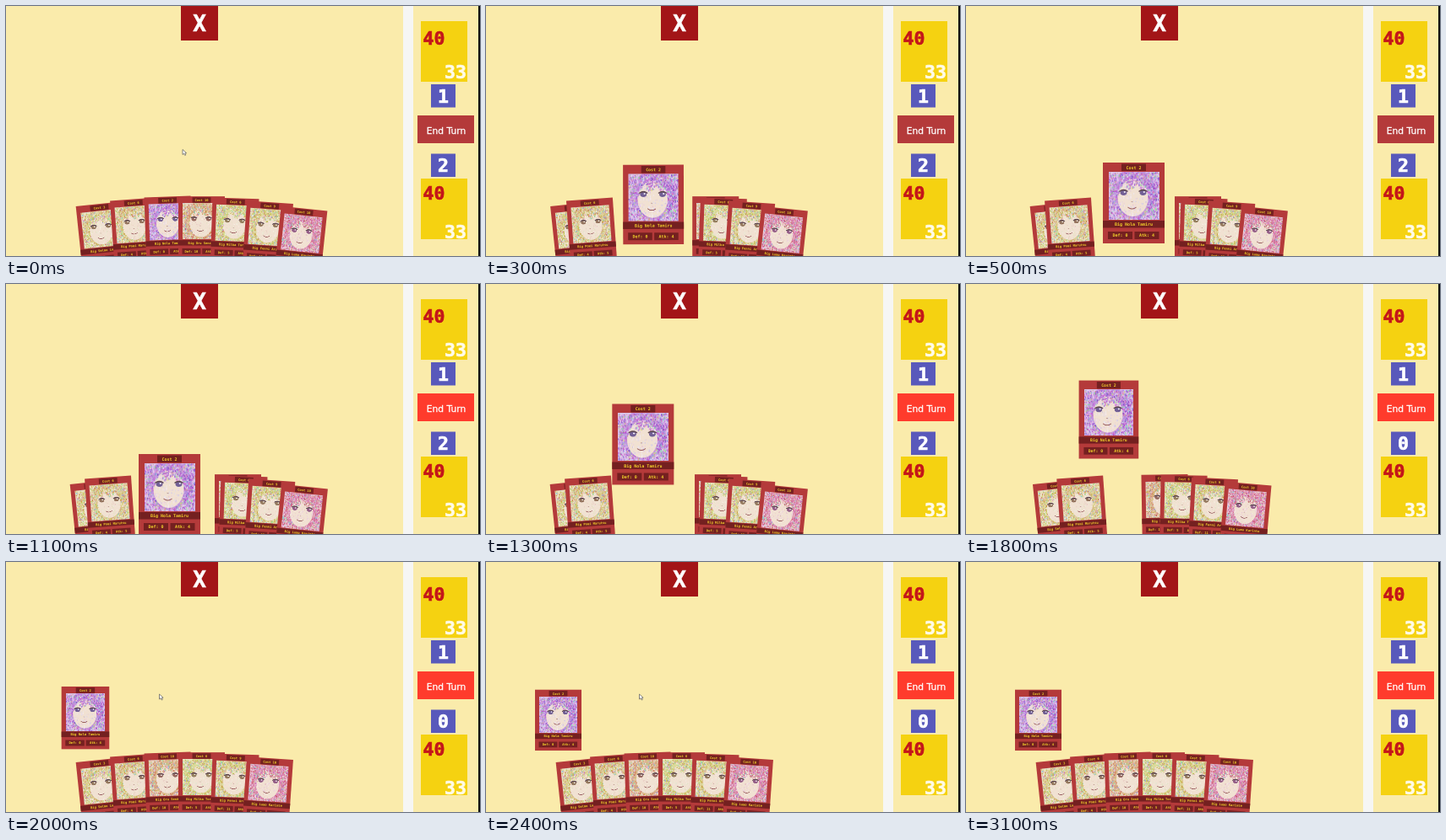
Write an HTML page with a canvas that moves like this. It is 561x297 px and loops after 3.3 s.

```html
<!DOCTYPE html>
<html lang="en">
<head>
<meta charset="utf-8">
<title>Card table</title>
<style>
  html, body { margin: 0; width: 100%; height: 100%; overflow: hidden; background: #faebab; }
  canvas { display: block; }
</style>
</head>
<body>
<canvas id="stage" width="561" height="297"></canvas>
<script>
const ctx = document.getElementById('stage').getContext('2d');
const LOOP = 3300, STEP = 100;
const CARD_W = 73, CARD_H = 96, SMALL = 55;
const RED = '#b43a3a', DARK = '#742020', GOLD = '#f2d02a';
const MONO = '"DejaVu Sans Mono", monospace', SANS = '"DejaVu Sans", sans-serif';
const PLAYED = 2;

// Poses are [x, y, width, tilt], with x and y at the middle of the top edge
const HOVER = [198.5, 186, CARD_W, 0];
const GRAB = [193.5, 202, CARD_W, 0];
const DROP = [181.5, 109, CARD_W, 0];
const TABLE = [85.5, 151.7, SMALL, 0];

const cards = [
  { cost: 3, name: 'Big Selmo Luta', def: 6, hue: 48 },
  { cost: 6, name: 'Big Pomi Marutsu', def: 4, hue: 44 },
  { cost: 2, name: 'Big Nola Tamiru', def: 0, hue: 280 },
  { cost: 10, name: 'Big Oru Senavi', def: 10, hue: 30 },
  { cost: 6, name: 'Big Milka Toruni', def: 5, hue: 56 },
  { cost: 9, name: 'Big Fenni Aruto', def: 11, hue: 50 },
  { cost: 10, name: 'Big Lumo Karinte', def: 8, hue: 335 }
];
cards.forEach((card, i) => card.art = paintPortrait(card.hue, i + 7));

const mix = (a, b, k) => a.map((v, i) => v + (b[i] - v) * k);
const progress = (t, from, to) => Math.min(1, Math.max(0, (t - from) / (to - from)));
const easeOut = (k, power) => 1 - (1 - k) ** power;
const easeInOut = k => k < .5 ? 4 * k ** 3 : 1 - 4 * (1 - k) ** 3;

function random(seed) {
  return () => (seed = seed * 16807 % 2147483647) / 2147483647;
}

// Speckled portrait, 60 by 57 units
function paintPortrait(hue, seed) {
  const art = document.createElement('canvas');
  art.width = 120;
  art.height = 114;
  const g = art.getContext('2d'), rnd = random(seed * 7919);
  const oval = (x, y, rx, ry, color) => {
    g.fillStyle = color;
    g.beginPath();
    g.ellipse(x, y, rx, ry, 0, 0, 7);
    g.fill();
  };
  const curve = (x, y, dx, bend, color, width) => {
    g.strokeStyle = color;
    g.lineWidth = width;
    g.beginPath();
    g.moveTo(x - dx, y);
    g.quadraticCurveTo(x, y + bend, x + dx, y);
    g.stroke();
  };
  const flecks = (count, inside, color) => {
    for (let i = 0; i < count; i++) {
      const x = rnd() * 60, y = rnd() * 57;
      g.fillStyle = color();
      if (inside(x, y)) g.fillRect(x, y, .7 + rnd(), .8 + rnd() * 2);
    }
  };
  const inFace = (x, y) => ((x - 29) / 18) ** 2 + ((y - 31) / 22) ** 2 < 1
    && y > 13 + 7 * Math.abs(Math.sin(x / 5 + seed));
  const hairFleck = () => {
    const accent = rnd() < .25;
    const tone = accent ? rnd() * 360 : hue + (rnd() - .5) * 50;
    return `hsl(${tone} 55% ${accent ? 70 : 48 + rnd() * 46}% / .75)`;
  };

  g.scale(2, 2);
  g.fillStyle = `hsl(${hue} 45% 84%)`;
  g.fillRect(0, 0, 60, 57);
  oval(30, 26, 27, 30, `hsl(${hue} 50% 73%)`);
  oval(29, 31, 18, 22, '#f1e1d2');
  flecks(2200, (x, y) => !inFace(x, y), hairFleck);
  flecks(350, inFace, () => `hsl(${hue + (rnd() - .5) * 90} 45% ${80 + rnd() * 16}% / .6)`);
  for (const x of [18, 41]) {
    oval(x, 25, 4, 3, `hsl(${hue - 20} 22% 48%)`);
    curve(x, 23.5, 5, -4, '#5c4650', 1.4);
    oval(x + 1.3, 24, 1.1, .9, '#fff');
  }
  curve(28, 35, 1, 1, '#b8948a', .7);
  curve(28, 42, 5, 4, '#95595a', .9);
  return art;
}

function box(color, x, y, w, h) {
  ctx.fillStyle = color;
  ctx.fillRect(x, y, w, h);
}

function label(text, x, y, size, color, { font = MONO, weight = 'bold', outline = 0 } = {}) {
  ctx.font = `${weight} ${size}px ${font}`;
  ctx.textAlign = 'center';
  ctx.fillStyle = ctx.strokeStyle = color;
  ctx.lineWidth = outline;
  ctx.fillText(text, x, y);
  if (outline) ctx.strokeText(text, x, y);
}

function number(value, x, y, color) {
  label(value, x, y, 21.5, color, { outline: .7 });
}

function drawCard(card, i, [x, y, w, tilt]) {
  ctx.save();
  ctx.translate(x, y);
  ctx.rotate(tilt * Math.PI / 180);
  ctx.scale(w / CARD_W, w / CARD_W);
  ctx.translate(-CARD_W / 2, 0);
  box(RED, 0, 0, CARD_W, CARD_H);
  box(DARK, 22, 1.5, 29, 8.5);
  label('Cost ' + card.cost, 36.5, 7.8, 5, GOLD);
  ctx.drawImage(card.art, 6.5, 11, 60, 57);
  box(DARK, 0, 69, CARD_W, 8.5);
  label(card.name, 36.5, 75.2, 5, GOLD);
  box(DARK, 6, 82, 29, 9);
  box(DARK, 37.5, 82, 29, 9);
  label('Def: ' + card.def, 20.5, 88.3, 5, GOLD);
  label('Atk: ' + (4 + i % 2), 52, 88.3, 5, GOLD);
  ctx.restore();
}

function drawDeck(y, inset) {
  box('#f5d211', 491, y, 55, 72);
  number(40, 506.5, y + inset, '#c4161a');
  number(33, 532, y + 96 - inset, '#fffbe8');
}

function drawMana(value, y) {
  box('#5959bb', 503, y, 29, 27.5);
  number(value, 517.5, y + 21.5, '#fff');
}

function drawCursor(x, y) {
  ctx.beginPath();
  [[0, 0], [0, 6], [1.5, 4.7], [2.8, 7], [3.8, 6.4], [2.8, 4.3], [4.6, 4.2]]
    .forEach(([dx, dy]) => ctx.lineTo(x + dx, y + dy));
  ctx.closePath();
  ctx.fillStyle = '#fff';
  ctx.fill();
  ctx.strokeStyle = '#555';
  ctx.lineWidth = .7;
  ctx.stroke();
}

function fanPose(slot) {
  return [110 + 40.5 * slot, 226 + 1.3 * (slot - 2.65) ** 2, SMALL, 2 * (slot - 3)];
}

// Neighbours part around the lifted card, then close up the gap
function handPose(i, t) {
  const after = i > PLAYED;
  const push = (after ? 43 : -30) * 4.3 ** (1 - Math.abs(i - PLAYED));
  const pose = fanPose(i);
  pose[0] += push * easeOut(progress(t, 0, 500), 3);
  return mix(pose, fanPose(after ? i - 1 : i), progress(t, 1620, 2000));
}

function playedPose(t) {
  if (t < 1100) return mix(fanPose(PLAYED), HOVER, easeOut(progress(t, 0, 500), 3));
  const dragged = mix(GRAB, DROP, easeOut(progress(t, 1100, 1600), 2));
  return mix(dragged, TABLE, easeInOut(progress(t, 1640, 2140)));
}

function draw(t) {
  box('#faebab', 0, 0, 561, 297);
  box('#f6f6f4', 470, 0, 12, 297);
  box('#111', 559, 0, 2, 297);

  box('#a31517', 207, 0, 44, 41);
  label('X', 229, 30, 26, '#fff', { outline: .6 });

  drawDeck(18, 28);
  drawMana(1, 93);
  box(t < 1100 ? RED : '#ff3b2c', 487, 130, 67, 33);
  label('End Turn', 521, 151.5, 10.7, '#fff', { font: SANS, weight: 'normal', outline: .3 });
  drawMana(t < 1700 ? 2 : 0, 175.5);
  drawDeck(205, 25);

  const lifted = t >= 100;
  cards.forEach((card, i) => {
    if (i !== PLAYED) drawCard(card, i, handPose(i, t));
    else if (!lifted) drawCard(card, i, playedPose(t));
  });
  if (lifted) drawCard(cards[PLAYED], PLAYED, playedPose(t));

  if (!lifted) drawCursor(209, 170.5);
  if (t >= 2000 && t < 3100) drawCursor(181.5, 157);
}

const start = performance.now();
function tick() {
  const t = (performance.now() - start) % LOOP;
  draw(Math.floor(t / STEP) * STEP);
  requestAnimationFrame(tick);
}
tick();
</script>
</body>
</html>
```
